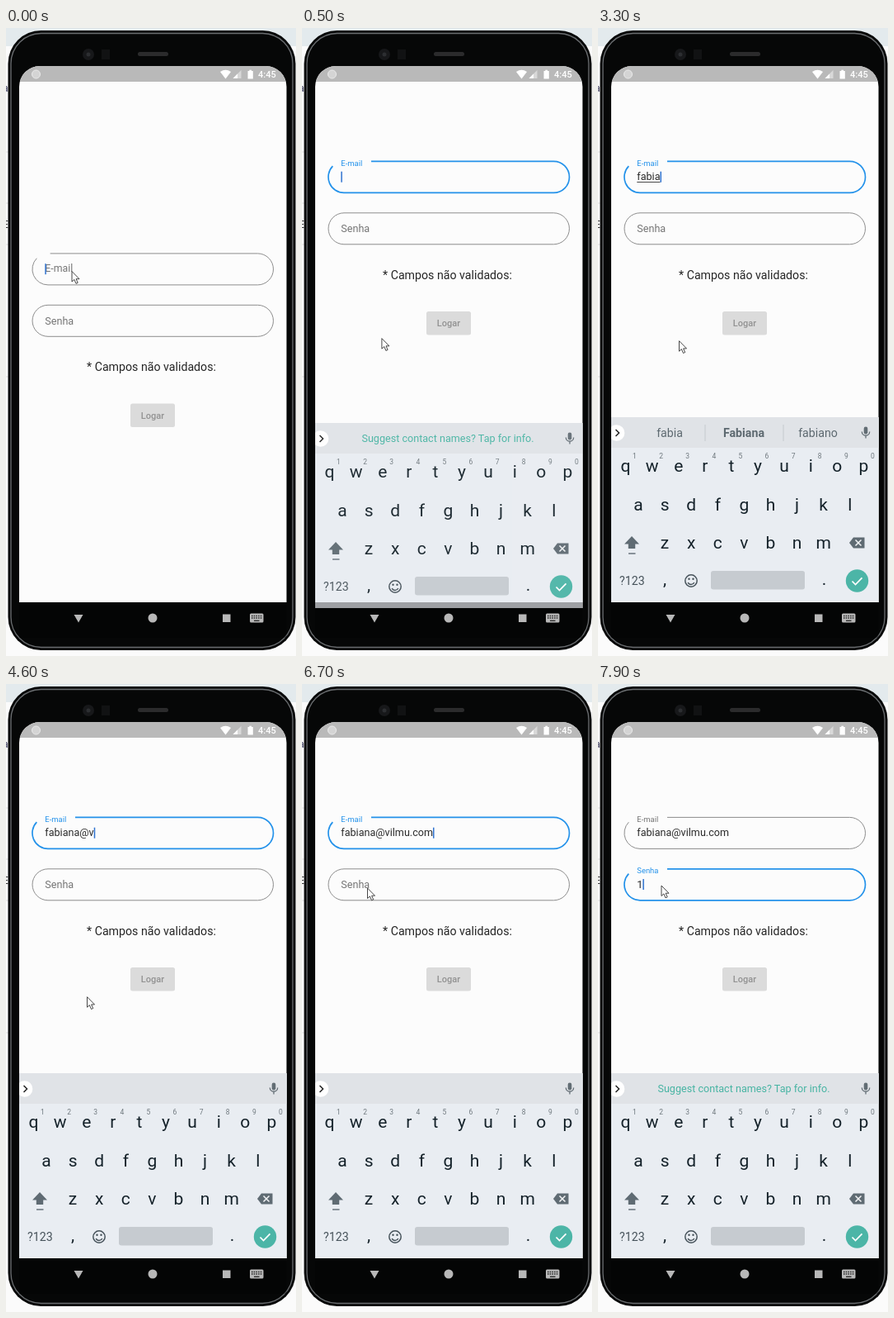
An HTML page that plays this animation: 352x760 px, repeating every 8000 ms.

```html
<!DOCTYPE html>
<html lang="pt">
<head>
<meta charset="utf-8">
<title>Login</title>
<style>
html, body { margin: 0; width: 100%; height: 100%; overflow: hidden; background: #fbfbfb; }
svg { display: block; width: 352px; height: 760px; font-family: Roboto, sans-serif; }
.mid { text-anchor: middle; }
.key { font-size: 21px; fill: #15222a; text-anchor: middle; }
.digit { font-size: 8.5px; fill: #6f787e; text-anchor: middle; }
.value { font-size: 12.6px; fill: #2b2b2b; }
.line { fill: none; }
</style>
</head>
<body>
<svg viewBox="0 0 352 760">
  <defs>
    <clipPath id="screen"><path d="M16 695V71A25 25 0 0 1 41 46H315.500A25 25 0 0 1 340.500 71V695Z"/></clipPath>
    <clipPath id="panel"><rect x="16" y="46" width="324.500" height="692"/></clipPath>
  </defs>

  <rect width="352" height="760" fill="#fbfbfb"/>
  <rect width="352" height="22" fill="#e3eaed"/>
  <path d="M0 150H3M0 212H3M0 262H3M0 422H3" stroke="#ddd"/>
  <text x="-4" y="77" font-size="12" fill="#335">a</text>
  <text x="-4" y="242" font-size="12" fill="#333">E</text>

  <rect x="2.500" y="3" width="349" height="750" rx="40" fill="#060707"/>
  <rect x="6" y="6.500" width="342" height="743" rx="36.500" fill="none" stroke="#6a6d70" stroke-width="1.300"/>
  <circle cx="100" cy="32" r="7" fill="#17181a"/>
  <circle cx="100" cy="32" r="2.500" fill="#2c2e31"/>
  <rect x="116" y="26" width="10" height="12" fill="#111213"/>
  <rect x="160" y="29" width="37" height="5" rx="2.500" fill="#2b2b2c"/>

  <g clip-path="url(#screen)">
    <rect x="16" y="46" width="325" height="650" fill="#fcfcfc"/>
    <rect x="16" y="46" width="325" height="19" fill="#b9b9b9"/>
    <circle cx="36.500" cy="56" r="5" fill="#d4d4d4" stroke="#e9e9e9"/>
    <g fill="#fff">
      <path d="M266.500 61.500L260 53Q266.500 48.500 273 53Z"/>
      <path d="M285.500 51V61H275.500Z" fill="#d9d9d9"/>
      <path d="M281 55.500V61H275.500Z"/>
      <path d="M293.500 52H295.300V50.800H298V52H299.800V61.500H293.500Z"/>
      <text x="306" y="60" font-size="11" font-weight="500">4:45</text>
    </g>
    <g id="form">
      <path id="mailBox" class="line"/>
      <path id="passBox" class="line"/>
      <text id="mailLabel" x="47.300"></text>
      <text id="passLabel" x="47.300"></text>
      <text id="mailText" class="value" x="47.300" y="184.200"></text>
      <path id="under" stroke="#333" stroke-width=".9"/>
      <text id="passText" class="value" x="47.300" y="247"></text>
      <rect id="caret" width="1.500" height="13" fill="#2f72cf"/>
      <text x="176.500" y="303.500" class="mid" font-size="14.180" fill="#252525">* Campos não validados:</text>
      <rect x="151" y="343" width="54" height="28.500" rx="2.500" fill="#dbdbdb"/>
      <text x="178" y="361.300" class="mid" font-size="11" font-weight="500" fill="#929292">Logar</text>
    </g>
  </g>

  <g clip-path="url(#panel)">
    <g id="board">
      <rect x="16" y="471" width="325" height="224" fill="#fcfcfc"/>
      <g id="boardFace">
        <rect x="16" y="471" width="325" height="224" fill="#e9edf2"/>
        <rect x="16" y="471" width="325" height="37" fill="#e0e3e7"/>
        <circle cx="22.500" cy="490" r="9.800" fill="#fff"/>
        <path class="line" d="M21.500 486L25.500 490L21.500 494" stroke="#222" stroke-width="1.500"/>
        <g id="hint"><text x="177" y="494.300" class="mid" font-size="12.600" fill="#47b4a3">Suggest contact names? Tap for info.</text></g>
        <g id="words" class="mid" font-size="14.180" fill="#5d6970">
          <text id="typed" x="87" y="495"></text>
          <text x="177" y="495" font-weight="700">Fabiana</text>
          <text x="267" y="495">fabiano</text>
          <path d="M130 480V500M225 480V500" stroke="#c5cace"/>
        </g>
        <rect x="322.700" y="482.500" width="4.600" height="9" rx="2.300" fill="#626d74"/>
        <path class="line" d="M320.300 488.500A4.700 4.700 0 0 0 329.700 488.500M325 493V496.500" stroke="#626d74" stroke-width="1.300"/>
        <g id="keys"></g>
        <path d="M41 615L50 624.500H45.200V630H36.800V624.500H32Z" fill="#5f6b73"/>
        <path d="M37 636H45.500" stroke="#5f6b73" stroke-width="1.400"/>
        <path d="M305 623L310 616.500H323.500V629.500H310Z" fill="#5f6b73"/>
        <path d="M312.500 619.500L319.500 626.500M319.500 619.500L312.500 626.500" stroke="#f2f4f6" stroke-width="1.500"/>
        <text x="26" y="674" font-size="14.200" fill="#46525a">?123</text>
        <g class="line" stroke="#46525a" stroke-width="1.500">
          <circle cx="113" cy="669" r="7.200"/>
          <path d="M109.200 671A4.200 4.200 0 0 0 116.800 671"/>
        </g>
        <circle cx="110.500" cy="666.700" r="1.200" fill="#46525a"/>
        <circle cx="115.500" cy="666.700" r="1.200" fill="#46525a"/>
        <rect x="137" y="657" width="114" height="22.500" rx="3" fill="#c6cbd0"/>
        <circle cx="314.500" cy="669" r="13.700" fill="#4cb5a7"/>
        <path class="line" d="M308.500 669.500L312.500 673.500L320.500 665.300" stroke="#fff" stroke-width="1.700"/>
      </g>
    </g>
    <rect x="16" y="695" width="325" height="44" fill="#000" opacity=".33"/>
  </g>

  <g fill="#b8b8b8">
    <path d="M82.500 710H93.500L88 719.500Z"/>
    <circle cx="178" cy="714" r="5.500"/>
    <rect x="263" y="709.500" width="9.500" height="9.500"/>
    <rect x="296" y="708.500" width="16.500" height="11" rx="1.500"/>
  </g>
  <g stroke="#000" stroke-opacity=".8" stroke-width="1.300">
    <path d="M298 711.500H310.500M298 714H310.500" stroke-dasharray="1.500 1.200"/>
    <path d="M301 717.300H307.500"/>
  </g>

  <path id="mouse" d="M0 0V12.500L2.900 9.900L5 14.800L7.200 13.800L5.100 9.200H9Z" fill="#fff" stroke="#333" stroke-width=".9"/>
</svg>

<script>
const LOOP = 8000, TICK = 100, LEFT = 47.3;
const MAIL = 'fabiana@vilmu.com';
const BLUE = '#2492ea', GREY = '#757575';
const $ = id => document.getElementById(id);

// Tables hold [time, values...]
const typing = [[0, 0], [1900, 2], [2600, 3], [2900, 4], [3200, 5], [3400, 6], [3600, 7], [4200, 8],
  [4600, 9], [4700, 10], [4900, 11], [5000, 12], [5100, 13], [5300, 14], [5400, 15], [5600, 16], [5700, 17]];
const blinks = [0, 600, 1000, 1500, 1900, 2400, 2600, 6200, 6700, 7500, 7900];
const mousePath = [[0, 80, 294.5], [100, 81, 298], [400, 95.3, 372.6], [600, 98.5, 378.7],
  [6100, 98.5, 378.7], [6300, 94, 345], [6600, 80.5, 254], [6700, 79.5, 247], [7000, 77, 244]];
const slide = [[100, 150, 0], [200, 100, .2], [300, 56, .5], [400, 26, .78], [500, 7, .95], [600, 0, 1]];
const mailFloat = [[0, .08], [100, .6], [200, 1]];
const passFloat = [[7000, 0], [7100, .3], [7200, .75], [7300, 1]];

const held = (rows, t) => rows.filter(r => r[0] <= t).pop()[1];
const mix = (a, b, p) => a + (b - a) * p;

function tween(rows, t) {
  const i = rows.findIndex(r => r[0] > t);
  if (i < 1) return (i ? rows[rows.length - 1] : rows[0]).slice(1);
  const a = rows[i - 1], b = rows[i], p = (t - a[0]) / (b[0] - a[0]);
  return a.slice(1).map((v, k) => mix(v, b[k + 1], p));
}

function set(id, attrs) {
  for (const k in attrs) $(id).setAttribute(k, attrs[k]);
}

function addKeys() {
  const text = (cls, x, y, s) => `<text class="${cls}" x="${x}" y="${y}">${s}</text>`;
  const rows = [['qwertyuiop', 33.5, 537], ['asdfghjkl', 49, 583.5], ['zxcvbnm', 81, 630]];
  let out = text('key', 81, 674, ',') + text('key', 274.5, 674, '.');
  rows.forEach(([chars, x0, y], r) => [...chars].forEach((c, i) => {
    const x = x0 + 32.1 * i;
    out += text('key', x, y, c);
    if (!r) out += text('digit', x + 11, 521, (i + 1) % 10);
  }));
  $('keys').innerHTML = out;
}

// Pill outline whose top edge opens for the floating label
function outline(mid, p) {
  const r = 19, top = mid - r, low = mid + r;
  const body = `H305.500A${r} ${r} 0 0 1 305.500 ${low}H51A${r} ${r} 0 0 1 `;
  return p ? `M${mix(51, 84, p)} ${top}${body}37.300 ${mid - 13.2}` : `M51 ${top}${body}51 ${top}Z`;
}

function field(name, label, mid, p, focus) {
  set(name + 'Box', { d: outline(mid, p), stroke: focus ? BLUE : '#808080', 'stroke-width': focus ? 1.7 : .9 });
  set(name + 'Label', { y: mid + mix(4.5, -13.8, p), 'font-size': mix(12.6, 9.45, p), fill: focus ? BLUE : GREY });
  $(name + 'Label').textContent = label;
}

function draw(time) {
  const t = Math.floor(time / TICK) * TICK;
  const onPass = t >= 7100;
  set('form', { transform: `translate(0 ${t < 300 ? 111.5 : 0})` });
  field('mail', 'E-mail', 180.4, tween(mailFloat, t)[0], t >= 100 && !onPass);
  field('pass', 'Senha', 242.8, tween(passFloat, t)[0], onPass);

  const mail = MAIL.slice(0, held(typing, t));
  $('mailText').textContent = mail;
  $('passText').textContent = t >= 7900 ? '1' : '';
  const mailEnd = LEFT + (mail ? $('mailText').getComputedTextLength() : 0);
  const passEnd = LEFT + (t >= 7900 ? $('passText').getComputedTextLength() : 0);
  set('under', { d: mail && t < 4200 ? `M${LEFT} 186.500H${mailEnd}` : '' });
  set('caret', {
    x: onPass ? passEnd : mailEnd,
    y: onPass ? 236 : 173.7,
    opacity: blinks.filter(b => b <= t).length % 2
  });

  const words = t >= 2600 && t < 4200;
  set('hint', { opacity: t < 2600 || t >= 7200 ? 1 : 0 });
  set('words', { opacity: words ? 1 : 0 });
  $('typed').textContent = words ? mail : '';

  const [drop, fade] = tween(slide, t);
  set('board', { transform: `translate(0 ${drop})`, opacity: fade ? 1 : 0 });
  set('boardFace', { opacity: fade });
  set('mouse', { transform: `translate(${tween(mousePath, t).join(' ')})` });
}

addKeys();
const start = performance.now();
function frame() {
  draw((performance.now() - start) % LOOP);
  requestAnimationFrame(frame);
}
frame();
</script>
</body>
</html>
```
